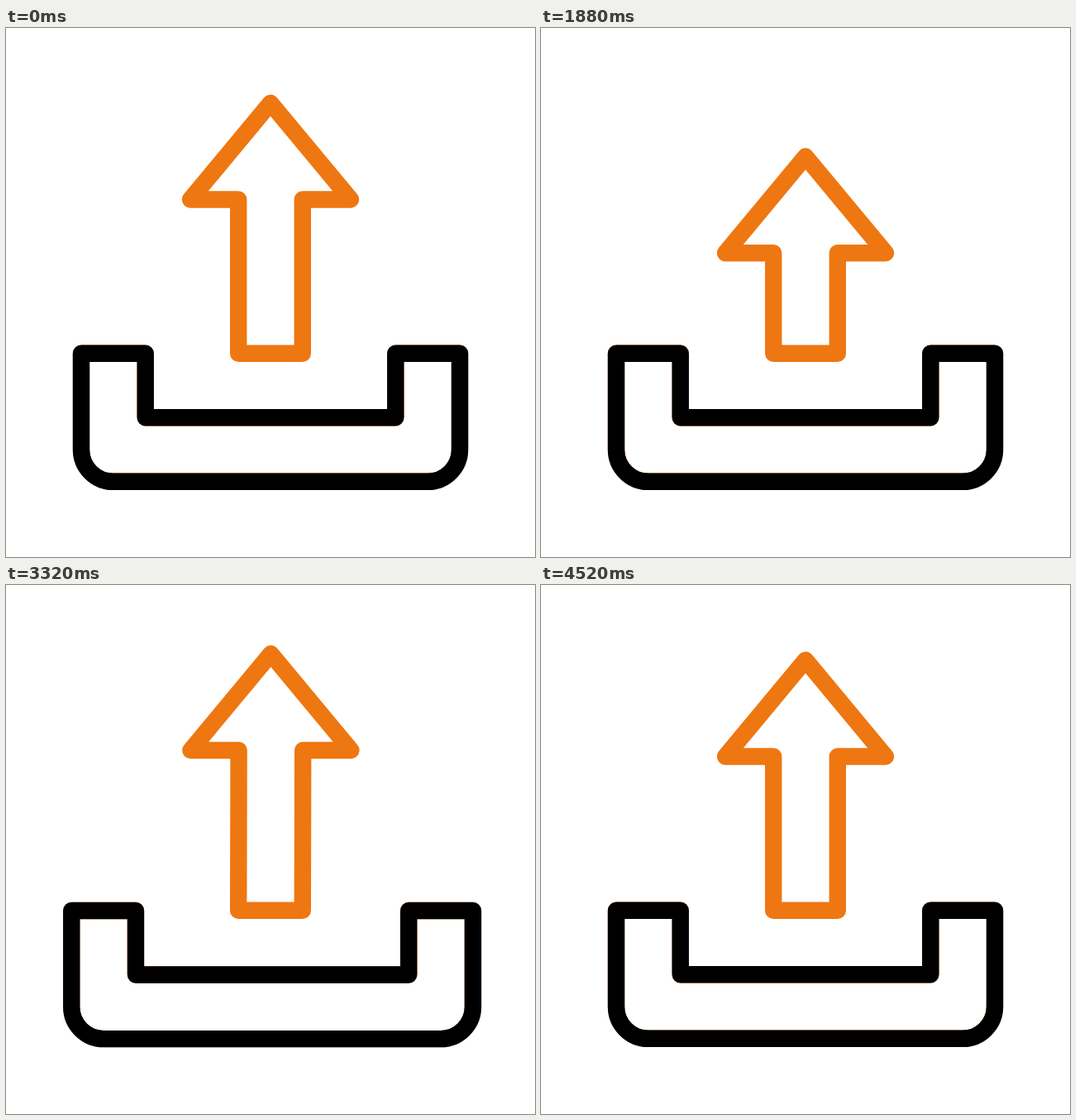
An HTML page that plays this animation: 640 by 640 pixels, repeating every 6000 ms.

```html
<!DOCTYPE html>
<html lang="en">
<head>
<meta charset="utf-8">
<title>Upload</title>
<style>
  html, body { margin: 0; height: 100%; overflow: hidden; background: #fff; }
  svg { display: block; width: 100%; height: 100%; }
  path { fill: none; stroke: #ee7712; stroke-width: 20.4; stroke-linejoin: round; }
  #tray { stroke: #000; }
</style>
</head>
<body>
<svg viewBox="0 0 640 640">
  <path id="edge"/>
  <path id="tray"/>
  <path id="arrow"/>
</svg>
<script>
const LOOP = 6000;

// Keyframes: [step, value], eased in and out between neighbours
const DROP = [[0, 0], [11, 95], [11.1, 95], [20.9, -48.6], [29.1, 33.5], [34, 0]];
const LEAN = [[20.9, 0], [29.1, 0.8], [34, 0]];
const STRETCH = [[14.1, 0], [20.9, 1], [27.95, 0]];

function sample(keys, step) {
  if (step <= keys[0][0]) return keys[0][1];
  for (let i = 1; i < keys.length; i++) {
    const [a, from] = keys[i - 1], [b, to] = keys[i];
    if (step < b) {
      const u = (step - a) / (b - a);
      return from + (to - from) * u * u * (3 - 2 * u);
    }
  }
  return keys[keys.length - 1][1];
}

function arrowPath(drop, lean) {
  const x = 320 + lean, head = 207.5 + drop;
  return `M${x} ${90.8 + drop}L${x + 97} ${head}H${x + 38.8}L358.8 393.7H281.2` +
    `L${x - 38.8} ${head}H${x - 97}Z`;
}

function trayPath(s) {
  const l = 91 - 31 * s, r = 549 + 42 * s, y = 393.7 + 0.8 * s;
  const slot = 77.7, c = 38.8;
  return `M${l} ${y}h${slot}v77.5H${r - slot}v-77.5H${r}v116.3` +
    `a${c} ${c} 0 0 1 ${-c} ${c}H${l + c}a${c} ${c} 0 0 1 ${-c} ${-c}Z`;
}

const [edge, tray, arrow] = ['edge', 'tray', 'arrow'].map(id => document.getElementById(id));

function draw() {
  // 7.5 poses a second, each shown on a 40 ms tick
  const tick = Math.floor(performance.now() % LOOP / 40);
  const step = Math.floor((tick + 0.5) * 0.3);
  const d = trayPath(sample(STRETCH, step));
  edge.setAttribute('d', d);
  tray.setAttribute('d', d);
  arrow.setAttribute('d', arrowPath(sample(DROP, step), sample(LEAN, step)));
  requestAnimationFrame(draw);
}
draw();
</script>
</body>
</html>
```
